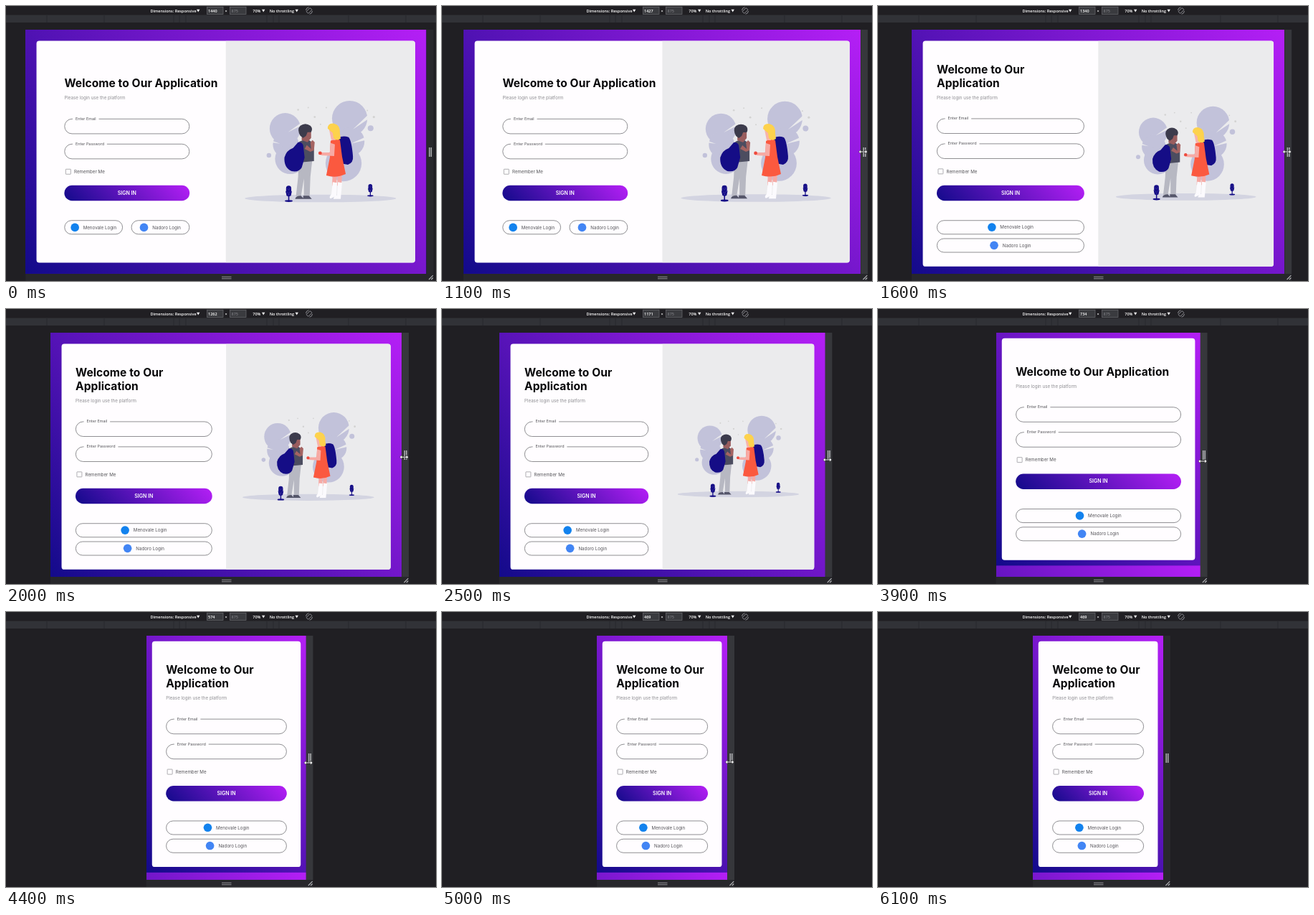
An HTML page that plays this animation: 600x383 px, repeating every 6200 ms.

```html
<!DOCTYPE html>
<html lang="en">
<head>
<meta charset="utf-8">
<title>Responsive login page</title>
<style>
  * { box-sizing: border-box; }
  html, body { margin: 0; width: 100%; height: 100%; overflow: hidden; background: #201f23; }
  .stage { position: absolute; left: 0; top: 0; width: 600px; height: 383px; overflow: hidden; }
  .chrome { position: absolute; left: 0; top: 0; }
  .chrome text { font: 600 5.5px "Open Sans", "Noto Sans", sans-serif; fill: #fff; }
  .chrome .dim { fill: #77787d; }

  .view { position: absolute; top: 33px; height: 340px; overflow: hidden; }
  .page {
    min-height: 876px; transform-origin: 0 0;
    font: 16px/20px Inter, sans-serif; color: #545458;
    background: linear-gradient(45deg, #120a8a, #b51ff6);
  }
  .body { padding: 40px; }
  .card { display: flex; min-height: 795px; border-radius: 10px; overflow: hidden; background: #fffdff; }
  .form {
    flex: 0 0 50%; min-width: 0; padding: 76.7px 50px 50px;
    display: flex; flex-direction: column; justify-content: center;
  }
  .art { flex: 0 0 50%; display: flex; align-items: center; justify-content: center; background: #ebebed; }
  .art svg { width: 80%; overflow: visible; }
  h1 { margin: 0; font-size: 40px; line-height: 50px; font-weight: 700; letter-spacing: .2px; color: #08080a; }
  .sub { margin: 16px 0 65.5px; color: #8e8e92; white-space: nowrap; }
  .field { position: relative; height: 55px; margin-bottom: 35px; border: 2px solid #6f6f73; border-radius: 28px; }
  .field span {
    position: absolute; left: 28px; top: -11px; padding: 0 10px;
    font-size: 14px; line-height: 18px; background: #fffdff; white-space: nowrap;
  }
  .check { display: flex; align-items: center; height: 20px; margin: 1px 0 39.5px 4px; }
  .check i { width: 20px; height: 20px; margin-right: 11px; border: 2px solid #98989c; border-radius: 2px; }
  .submit {
    height: 55px; border-radius: 28px; text-align: center; color: #fff;
    font-size: 18px; line-height: 54px; font-weight: 600;
    background: linear-gradient(45deg, #120a8a, #b51ff6);
  }
  .social { display: flex; flex-direction: column; gap: 14px; margin-top: 70px; }
  .social div {
    display: flex; align-items: center; justify-content: center; gap: 15px;
    height: 51px; border: 2px solid #6f6f73; border-radius: 26px; white-space: nowrap;
  }
  .social i { width: 30px; height: 30px; border-radius: 50%; }

  .wide .form { padding-left: 100px; padding-right: 0; }
  .wide .controls { width: 450px; }
  .wide .social { flex-direction: row; gap: 30px; }
  .wide .social div { flex: 0 0 210px; }
  .single .body { padding: 20px; }
  .single .form { flex-basis: 100%; }
  .single .art { display: none; }
</style>
</head>
<body>
<div class="stage">
  <div class="view" id="view">
    <div class="page" id="page">
      <div class="body" id="body">
        <div class="card">
          <div class="form">
            <h1>Welcome to Our Application</h1>
            <div class="sub">Please login use the platform</div>
            <div class="controls">
              <div class="field"><span>Enter Email</span></div>
              <div class="field"><span>Enter Password</span></div>
              <div class="check"><i></i>Remember Me</div>
              <div class="submit">SIGN IN</div>
              <div class="social">
                <div><i style="background:#1282ee"></i>Menovale Login</div>
                <div><i style="background:#4285f4"></i>Nadoro Login</div>
              </div>
            </div>
          </div>
          <div class="art">
            <svg viewBox="334 133 210 140">
              <ellipse cx="439" cy="267.7" rx="105" ry="5.3" fill="#d3d4e1"/>
              <g fill="#c2c2da">
                <circle cx="390" cy="171" r="21.5"/>
                <circle cx="391" cy="193" r="18"/>
                <circle cx="397" cy="213" r="21"/>
                <circle cx="479.5" cy="157" r="24.5"/>
                <circle cx="480" cy="189" r="20"/>
                <circle cx="471" cy="219" r="25"/>
                <circle cx="508.5" cy="170.500" r="4"/>
                <circle cx="367.500" cy="208" r="3.200"/>
              </g>
              <path d="M412 163L394 176L412 167ZM504 153L484 172L505 158ZM503 182L481 192L502 187ZM369 187L383 192L370 190Z" fill="#ebebed"/>
              <g fill="#d3d3d2">
                <circle cx="408" cy="145" r="1.3"/><circle cx="422" cy="142" r="1"/>
                <circle cx="431" cy="155" r="1.4"/><circle cx="447" cy="142" r="1"/>
                <circle cx="513" cy="155" r="1.6"/><circle cx="439" cy="165" r="1"/>
                <circle cx="504" cy="146" r="1"/>
              </g>
              <!-- boy -->
              <path d="M409 211H428L425 238L424 265H416L416 240L412 265H405L408 238Z" fill="#b7b8c2"/>
              <path d="M404 268Q405 264 412 264L416 268.500H404ZM415 264H423L427 268.500H415Z" fill="#55566a"/>
              <path d="M409 190Q414 186 423 187L430 192L430 216L409 218Z" fill="#4c4d60"/>
              <path d="M413 174H426L426 184L421 190L413 187Z" fill="#995d5e"/>
              <path d="M420 194L426 199L425 190L428 187L431 190L430 201L425 203L417 199Z" fill="#a56462"/>
              <path d="M411 181Q406 172 411 167Q418 162 425 167Q429 171 426 176L421 176L419 181L415 184Z" fill="#3c3b4c"/>
              <path d="M408 190Q413 189 415 194L417 211L413 225Q409 232 399 230Q388 225 389 211Q392 201 401 198Z" fill="#150d86"/>
              <!-- girl -->
              <path d="M456 232H462L461 250H455ZM463 232H469L468 250H462Z" fill="#f6aaa5"/>
              <path d="M456 245L462 246L461 264L453 268Q450 266 454 262ZM463 245L469 246L467 268.500H457Q457 265 462 263Z" fill="#fbfafd"/>
              <path d="M464 184Q470 180 478 183Q482 187 484 209Q485 218 477 221L466 219Z" fill="#150d86"/>
              <path d="M453 188Q460 184 466 187L469 210L474 234Q461 240 447 236L452 211Z" fill="#fb593f"/>
              <path d="M451 172H461L460 187L454 187Z" fill="#f8b3ab"/>
              <path d="M453 191L459 193L458 209L440 208L438 204L452 204Z" fill="#f7aaa4"/>
              <path d="M449 171Q449 163 458 164Q467 166 466 178L467 185Q461 189 457 184L456 177Z" fill="#fdd24d"/>
              <circle cx="438.500" cy="205" r="2.400" fill="#ee4a3d"/>
              <!-- shrubs -->
              <g id="shrub" fill="#150d86">
                <rect x="391.300" y="250" width="7.200" height="12.500" rx="3.500"/>
                <path d="M390.500 257L395 263L399.500 257L398 264L395.800 265V272H394.200V265L392 264Z"/>
                <ellipse cx="395" cy="271.200" rx="5.500" ry="1.400"/>
                <path d="M392.500 254L395 256L397.500 253M392.500 259L395 261L397.500 258" fill="none" stroke="#4d48a8" stroke-width=".5"/>
              </g>
              <use href="#shrub" transform="translate(204 55.200) scale(.77)"/>
            </svg>
          </div>
        </div>
      </div>
    </div>
  </div>

  <svg class="chrome" width="600" height="383" viewBox="0 0 600 383">
    <rect y="12.500" width="600" height="10.500" fill="#313237"/>
    <path d="M57 13V23M137 13V23M234 13V23M242 13V23M251 13V23M364 13V23M373 13V23M381 13V23M478 13V23M558 13V23" stroke="#27282c" stroke-width=".8"/>
    <g fill="#3a3b3f" stroke="#6b6c71" stroke-width=".7">
      <rect x="280.400" y="1.400" width="22.600" height="10"/>
      <rect x="312.400" y="1.400" width="22.600" height="10"/>
    </g>
    <text x="201.500" y="8.500">Dimensions: Responsive</text>
    <text x="282" y="8.500" id="width">1440</text>
    <text x="305.500" y="8.500">×</text>
    <text x="314.500" y="8.500" class="dim">875</text>
    <text x="344.300" y="8.500">70%</text>
    <text x="367.700" y="8.500">No throttling</text>
    <path d="M266 4.700h4.400l-2.200 3.800zM357 4.700h4.400l-2.200 3.800zM403.500 4.700h4.400l-2.200 3.800z" fill="#f1f1f3"/>
    <g fill="none" stroke="#97989d" stroke-width=".9">
      <rect x="421" y="2.800" width="4" height="7.400" rx=".8" transform="rotate(45 423 6.500)"/>
      <path d="M422.500 1.800Q418.700 2.300 418.500 6M423.500 11.200Q427.300 10.700 427.500 7"/>
    </g>
    <rect id="base" y="373" height="10" fill="#27272b"/>
    <path d="M301 377.300H314.500M301 379.700H314.500" stroke="#929397" stroke-width="1.100"/>
    <g id="handle">
      <rect id="strip" y="33" width="9.800" height="340"/>
      <path d="M4 197V210M6.500 197V210" stroke="#b4b5b8" stroke-width="1.500"/>
      <path d="M3.200 381L9 375.200M6.500 381L9 378.500" stroke="#b4b5b8" stroke-width="1.100"/>
    </g>
    <path id="cursor" d="M-6 0L-3-3V-.8H3V-3L6 0L3 3V.8H-3V3Z" fill="#fff" stroke="#111" stroke-width=".5"/>
  </svg>
</div>

<script>
  const LOOP = 6200, TICK = 100, SCALE = 0.3885, CENTER = 307.1;
  // time, viewport width, pointer height
  const STEPS = [
    [0, 1440, 203], [900, 1440, 203], [1400, 1408, 203], [1600, 1340, 203],
    [2100, 1243, 207], [2500, 1171, 210], [2800, 1068, 211], [3300, 906, 213],
    [3500, 854, 213], [3900, 734, 212], [4200, 648, 211], [4400, 574, 210],
    [4800, 469, 209], [LOOP, 469, 209]
  ];
  const $ = id => document.getElementById(id);
  const [view, page, body, label, base, handle, strip, cursor] =
    ['view', 'page', 'body', 'width', 'base', 'handle', 'strip', 'cursor'].map($);
  let last = -1;

  function stateAt(t) {
    const i = STEPS.findIndex(s => s[0] > t);
    const [a, b] = [STEPS[i - 1], STEPS[i]];
    const k = (t - a[0]) / (b[0] - a[0]);
    return [1, 2].map(n => a[n] + (b[n] - a[n]) * k);
  }

  function draw(t) {
    const [wide, y] = stateAt(t);
    const w = Math.round(wide), size = w * SCALE;
    const left = CENTER - size / 2, right = CENTER + size / 2;
    const active = t >= 500 && t < 5200;

    label.textContent = w;
    view.style.left = left + 'px';
    view.style.width = size + 'px';
    page.style.width = w + 'px';
    page.style.transform = `scale(${SCALE})`;
    page.className = 'page' + (w >= 1400 ? ' wide' : w <= 768 ? ' single' : '');
    page.style.backgroundSize = `100% ${body.offsetHeight}px`;

    base.setAttribute('x', left);
    base.setAttribute('width', size + 9.8);
    handle.setAttribute('transform', `translate(${right} 0)`);
    strip.setAttribute('fill', active ? '#36373b' : '#29292d');
    cursor.setAttribute('transform', `translate(${right + 3.2} ${y})`);
    cursor.style.display = active ? '' : 'none';
  }

  const start = performance.now();
  function frame() {
    const t = Math.floor((performance.now() - start) % LOOP / TICK) * TICK;
    if (t !== last) draw(last = t);
    requestAnimationFrame(frame);
  }
  frame();
</script>
</body>
</html>
```
